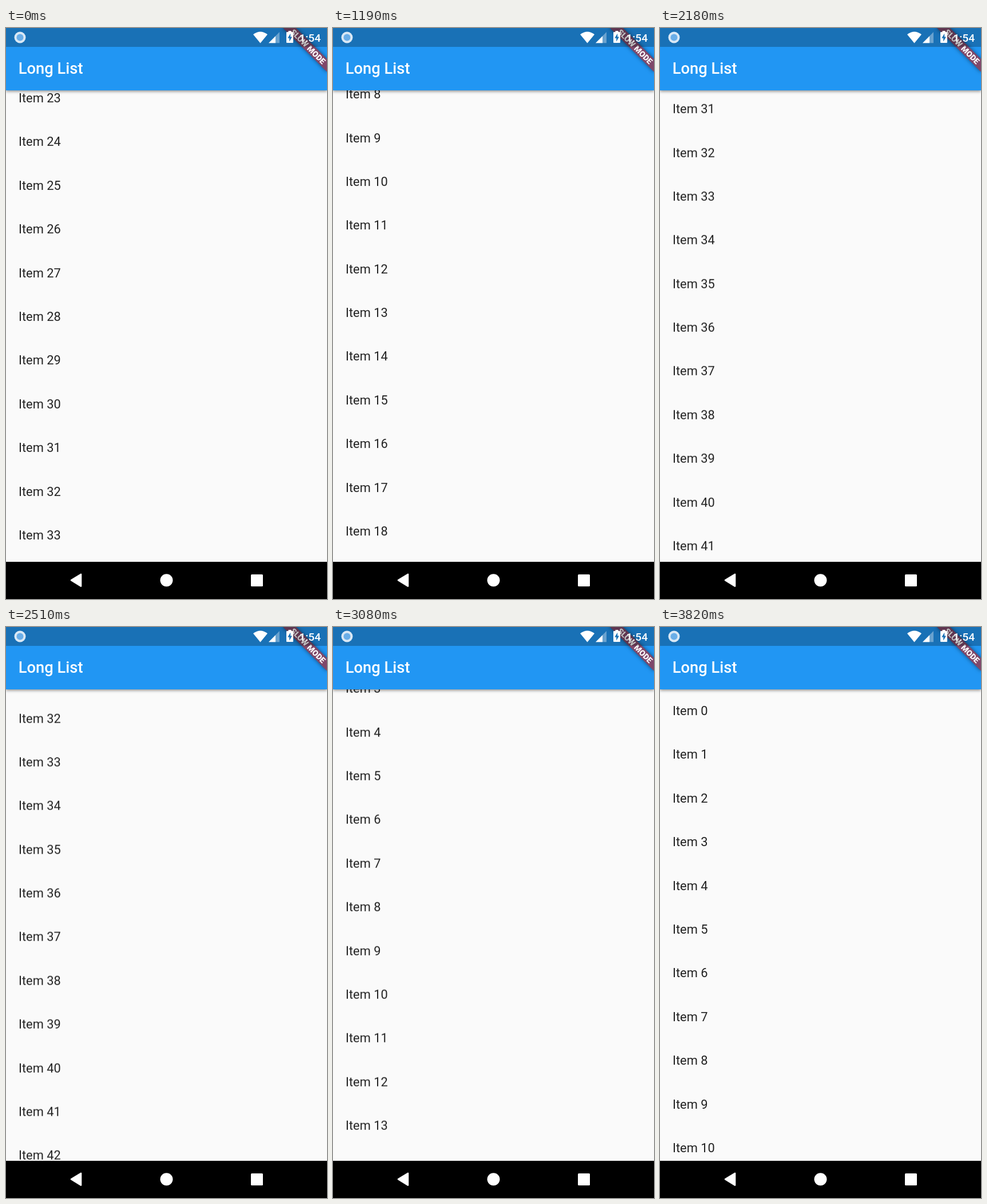
Animation of 561 by 998 pixels, one loop 3980 ms. Source, as an HTML page:

```html
<!DOCTYPE html>
<html lang="en">
<head>
<meta charset="utf-8">
<title>Long List</title>
<style>
  html, body { margin: 0; width: 100%; height: 100%; overflow: hidden; }
  body { position: relative; background: #fafafa; font-family: Roboto, Arial, sans-serif; }
  .view { position: absolute; left: 0; top: 109px; width: 561px; height: 824px; overflow: hidden; }
  .list { position: absolute; left: 21.8px; top: 0.2px; will-change: transform; }
  .row { height: 76.4px; line-height: 76.4px; font-size: 21.84px; color: rgba(0, 0, 0, .87); white-space: nowrap; }
  .view svg, .chrome { position: absolute; left: 0; top: 0; }
  .bar {
    position: absolute; left: 0; top: 0; width: 561px; height: 109px;
    background: #2196f3; box-shadow: 0 2px 5px rgba(0, 0, 0, .42);
  }
  .bar h1 {
    position: absolute; left: 21.8px; top: 33px; margin: 0;
    font-size: 27.3px; font-weight: 500; line-height: 76px; color: #fff; white-space: nowrap;
  }
  .corner { position: absolute; left: 0; top: 0; width: 561px; height: 120px; overflow: hidden; }
  .banner {
    position: absolute; left: 506.4px; top: 38.2px; width: 109.2px; height: 16.4px;
    transform-origin: 54.6px -38.2px; transform: rotate(45deg);
    background: rgba(183, 28, 28, .63); box-shadow: 0 0 7px rgba(0, 0, 0, .5);
    color: #fff; font-size: 13.9px; font-weight: 900; line-height: 16.4px;
    text-align: center; white-space: nowrap;
  }
</style>
</head>
<body>
<div class="view">
  <div class="list" id="list"></div>
  <svg width="561" height="120">
    <g id="glow"><circle cx="280.5" cy="-728.8" r="841.5" fill="#2196f3"/></g>
  </svg>
</div>

<div class="bar"><h1>Long List</h1></div>
<div class="corner"><div class="banner">SLOW MODE</div></div>

<svg class="chrome" width="561" height="998" fill="#fff">
  <rect width="561" height="33" fill="#000" fill-opacity=".25"/>
  <circle cx="24.5" cy="16.5" r="10" fill="#d9e8f5"/>
  <circle cx="24.5" cy="16.5" r="6" fill="#6aaee8"/>
  <path d="M444.5 26.5L432 11.2Q444.5 1.8 457 11.2Z"/>
  <path d="M459 26.3H478V7Z" fill-opacity=".35"/>
  <path d="M459 26.3H471V14.2Z"/>
  <path d="M493.5 7V5H498.5V7H501Q502 7 502 8V25Q502 26 501 26H491Q490 26 490 25V8Q490 7 491 7Z"/>
  <path d="M497.2 9.5L492.3 17.7H495.2V23.7L500 15.4H497.2Z" fill="#1971b6"/>
  <text x="550" y="23.5" text-anchor="end" font-size="19.1" font-weight="500">1:54</text>
  <rect y="933" width="561" height="65" fill="#000"/>
  <path d="M114 965.2L131 954.8V975.6Z" stroke="#fff" stroke-width="2.6" stroke-linejoin="round"/>
  <circle cx="280.5" cy="965.2" r="11"/>
  <rect x="428" y="955" width="21" height="21" rx="1.5"/>
</svg>

<script>
const LOOP = 3980;
const SCALE = 1.365;        // screen pixels per logical pixel
const GLOW = { hit: 3195, peak: 3278, fade: 600, opacity: 0.32 };

// Finger drags from touch to release, then the list coasts at v px/ms.
const swipes = [
  { touch: 90, release: 270, from: 1790, to: 1600, v: -3 },
  { touch: 1220, release: 1398, from: 640, to: 876, v: 4 },
  { touch: 2455, release: 2617, from: 2445, to: 2136, v: -5.6 }
];

const list = document.getElementById('list');
const glow = document.getElementById('glow');

for (let i = 0; i < 50; i++) {
  const row = document.createElement('div');
  row.className = 'row';
  row.textContent = 'Item ' + i;
  list.append(row);
}

// Friction curve of a clamped fling.
function coast(v, dt) {
  const duration = 1000 * Math.pow(Math.abs(v) * 1000 / SCALE / 2224, 0.736);
  const x = Math.min(dt / duration, 1);
  return v * duration / 3.065 * (1.2 * x ** 3 - 3.27 * x ** 2 + 3.065 * x);
}

function scrollAt(t) {
  const s = swipes.filter(w => t >= w.touch).pop();
  if (!s) return 1781 + t / 10;
  if (t >= s.release) return Math.max(0, s.to + coast(s.v, t - s.release));
  const span = s.release - s.touch;
  const dist = s.to - s.from;
  return s.from + dist * Math.pow((t - s.touch) / span, s.v * span / dist);
}

function glowAt(t) {
  if (t < GLOW.hit) return 0;
  if (t < GLOW.peak) return 1 - ((GLOW.peak - t) / (GLOW.peak - GLOW.hit)) ** 2;
  if (t >= 3820) return 0;
  return (1 - (t - GLOW.peak) / GLOW.fade) ** 2;
}

function draw(t) {
  list.style.transform = `translateY(${-scrollAt(t)}px)`;
  const g = glowAt(t);
  glow.setAttribute('transform', `scale(1 ${g})`);
  glow.setAttribute('opacity', g * GLOW.opacity);
}

const start = performance.now();
function tick() {
  draw((performance.now() - start) % LOOP);
  requestAnimationFrame(tick);
}
tick();
</script>
</body>
</html>
```
